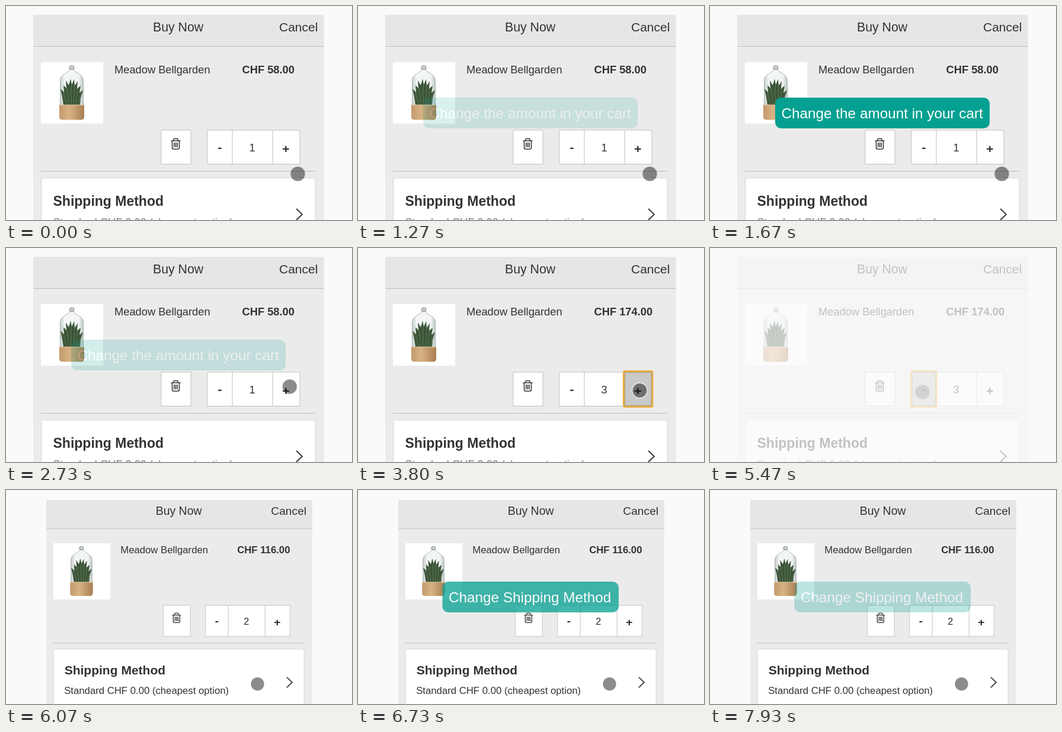
These frames come from a looping animation (584 by 362 pixels, 8 s). An HTML page:

```html
<!DOCTYPE html>
<html lang="en">
<head>
<meta charset="utf-8">
<title>Cart demo</title>
<style>
  html, body { margin: 0; width: 100%; height: 100%; overflow: hidden; background: #fafafa; }
  svg { display: block; font-family: "Liberation Sans", Arial, sans-serif; fill: #333; }
  .bold { font-weight: bold; }
  .mid { text-anchor: middle; }
  .item { font-size: 18.3px; }
  .note { font-size: 24.3px; fill: #fff; }
  .box { fill: #fff; stroke: #c2c2c2; }
  .rule { stroke: #bcbcbc; }
  .icon { fill: none; stroke: #333; }
  .dot { fill: #000; fill-opacity: .45; }

  /* One loop is 8 s, so 1 % is 80 ms. */
  .anim { animation: 8s linear infinite; }
  .swap { animation-timing-function: step-end; }
  .fade { animation-timing-function: cubic-bezier(.37, 0, .63, 1); }

  .first { animation-name: first; }
  .second { animation-name: second; }
  .before { animation-name: before; }
  .after { animation-name: after; }
  .on-plus { animation-name: on-plus; }
  .on-minus { animation-name: on-minus; }
  .halo { animation-name: halo; }
  .pointer { animation-name: pointer; }
  .note-a { animation-name: note-a; }
  .note-b { animation-name: note-b; }

  @keyframes first { 0%, 65% { opacity: 1 } 69.7%, 100% { opacity: 0 } }
  @keyframes second { 0%, 70.5% { opacity: 0 } 75.9%, 100% { opacity: 1 } }
  @keyframes before { 0% { opacity: 1 } 47.5%, 100% { opacity: 0 } }
  @keyframes after { 0% { opacity: 0 } 47.5%, 100% { opacity: 1 } }
  @keyframes on-plus { 0% { opacity: 0 } 47.5% { opacity: 1 } 64.1%, 100% { opacity: 0 } }
  @keyframes on-minus { 0% { opacity: 0 } 64.1%, 100% { opacity: 1 } }
  @keyframes halo { 0% { opacity: 0 } 47.5% { opacity: 1 } 55%, 100% { opacity: 0 } }
  @keyframes pointer {
    0%, 26.6% { transform: translate(492.5px, 284px) }
    34.1%, 38.3% { transform: translate(478.8px, 234.5px) }
    39.1%, 47.49% { transform: translate(479px, 246px) }
    47.5%, 55% { transform: translate(475.5px, 241px) }
    64.1%, 100% { transform: translate(358.5px, 243.5px) }
  }
  @keyframes note-a {
    0%, 14.2% { opacity: 0 }
    20.8%, 28.7% { opacity: 1 }
    36.2%, 100% { opacity: 0 }
  }
  /* The last fade is cut off by the end of the loop. */
  @keyframes note-b {
    0%, 79.2% { opacity: 0 }
    86.6% { opacity: 1 }
    94.2% { opacity: 1; animation-timing-function: linear }
    97% { opacity: .69; animation-timing-function: linear }
    99.1% { opacity: .27; animation-timing-function: linear }
    100% { opacity: .2 }
  }
</style>
</head>
<body>
<svg width="584" height="362" viewBox="0 0 584 362">
  <defs>
    <linearGradient id="wood">
      <stop offset="0" stop-color="#c39a6b"/>
      <stop offset=".4" stop-color="#d8b283"/>
      <stop offset="1" stop-color="#a97e52"/>
    </linearGradient>
    <linearGradient id="glass">
      <stop offset="0" stop-color="#c3cccb"/>
      <stop offset=".2" stop-color="#f4f7f6"/>
      <stop offset=".8" stop-color="#f1f4f3"/>
      <stop offset="1" stop-color="#bcc6c4"/>
    </linearGradient>

    <g id="plant">
      <rect x="59" y="95" width="105" height="104" fill="#fff"/>
      <path d="M91.500 168V126C91.500 114 106 114 108 107H114C116 114 130.500 114 130.500 126V168Z" fill="url(#glass)" stroke="#98a5a3" stroke-width=".8"/>
      <path d="M108 107Q105 101 111 101T114 107Z" fill="#c5cdcb" stroke="#6d7775" stroke-width=".8"/>
      <path d="M97 168L95 154 92 140 98 146 97 134 102 139 101 126 106 134 109 123 111 133 115 124 116 135 121 127 120 140 126 135 124 147 130 142 126 156 125 168Z" fill="#3c5438"/>
      <path d="M102 166L97 146M106 166L103 138M110 166L110 133M114 166L116 134M118 166L121 140M122 166L127 148" fill="none" stroke="#5d7d53"/>
      <path d="M90 167H132V187Q132 192.500 127 192.500H95Q90 192.500 90 187Z" fill="url(#wood)"/>
      <path d="M90.500 167.500H131.500" stroke="#dcbf98" stroke-width="1.500"/>
    </g>

    <g id="trash" class="icon" stroke-width="1.500">
      <path d="M278.500 228H294.500M283 228V225.500Q283 224.500 284 224.500H289Q290 224.500 290 225.500V228"/>
      <path d="M280.500 228V239.500Q280.500 242 283 242H290Q292.500 242 292.500 239.500V228M283.800 231V239M286.500 231V239M289.200 231V239"/>
    </g>

    <g id="page">
      <rect x="46" y="15" width="491" height="400" fill="#ebebeb"/>
      <rect x="46" y="15" width="491" height="53" fill="#e6e6e6"/>
      <path class="rule" d="M46 68.500H537M59 279.500H522"/>
      <text x="248" y="42.500" font-size="21.300">Buy Now</text>
      <text x="461" y="43" font-size="21">Cancel</text>
      <use href="#plant"/>
      <text class="item" x="183" y="114">Meadow Bellgarden</text>
      <rect class="box" x="262" y="210" width="50" height="57.500"/>
      <use href="#trash"/>
      <rect class="box" x="340" y="210" width="156" height="57.500"/>
      <path class="rule" d="M382 210V267.500M450 210V267.500"/>
      <rect x="59.500" y="291" width="462.500" height="120" rx="4" fill="#fff" stroke="#d6d6d6"/>
      <text class="bold" x="79.500" y="338" font-size="23">Shipping Method</text>
      <path class="icon" d="M490 343L500 352.500 490 362" stroke-width="1.900"/>
    </g>

    <g id="signs" class="bold mid">
      <text x="361" y="246" font-size="21">-</text>
      <text x="472.500" y="248.500" font-size="21">+</text>
    </g>
  </defs>

  <g class="anim first">
    <use href="#page"/>
    <text x="79.500" y="372" font-size="18.300" fill="#808080">Standard CHF 0.00 (cheapest option)</text>
    <g class="anim swap before">
      <text class="item bold" x="398.500" y="114">CHF 58.00</text>
      <text class="item mid" x="415.500" y="246">1</text>
    </g>
    <g class="anim swap after">
      <text class="item bold" x="398.500" y="114">CHF 174.00</text>
      <text class="item mid" x="415.500" y="246">3</text>
    </g>
    <g class="anim swap on-plus">
      <rect x="448.500" y="208.500" width="48.500" height="60" rx="2" fill="#c9c9c9" stroke="#e9ad42" stroke-width="3"/>
      <rect x="450.500" y="210.500" width="44.500" height="56" fill="none" stroke="#7d6a45" stroke-dasharray="1 1"/>
    </g>
    <g class="anim swap on-minus">
      <rect x="339.500" y="208.500" width="42.500" height="60" rx="2" fill="#c9c9c9" stroke="#e9ad42" stroke-width="3"/>
      <rect x="341.500" y="210.500" width="38.500" height="56" fill="none" stroke="#7d6a45" stroke-dasharray="1 1"/>
    </g>
    <use href="#signs"/>
    <g class="anim fade pointer">
      <circle class="dot" r="12.200"/>
      <circle class="anim swap halo" r="13" fill="none" stroke="#e2e2e2" stroke-width="1.800"/>
    </g>
  </g>

  <g class="anim second">
    <g transform="translate(26 3.200) scale(.914)">
      <use href="#page"/>
      <use href="#signs"/>
      <text x="79" y="374.500" font-size="18.300">Standard CHF 0.00 (cheapest option)</text>
      <text class="item bold" x="398.500" y="114">CHF 116.00</text>
      <text class="item mid" x="415.500" y="246">2</text>
      <circle class="dot" cx="436" cy="355.400" r="12.200"/>
    </g>
  </g>

  <g class="anim fade note-a">
    <rect x="110" y="155" width="362" height="52" rx="10" fill="#04a091"/>
    <text class="note" x="120.500" y="190">Change the amount in your cart</text>
  </g>
  <g class="anim fade note-b">
    <rect x="142.500" y="155" width="297.500" height="52" rx="10" fill="#04a091"/>
    <text class="note" x="153" y="190">Change Shipping Method</text>
  </g>
</svg>
</body>
</html>
```
